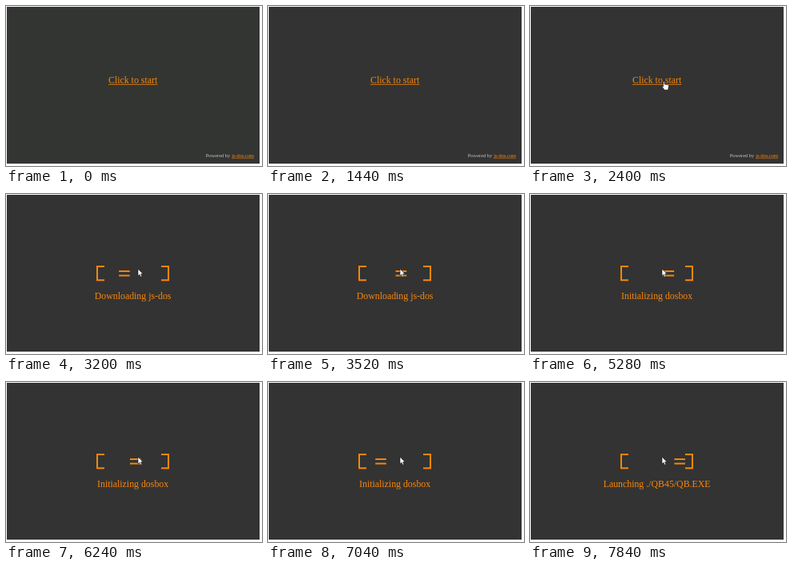
Animation of 320x201 px, one loop 8000 ms. Source, as an HTML page:

```html
<!DOCTYPE html>
<html lang="en">
<head>
<meta charset="utf-8">
<title>Loader</title>
<style>
  html, body { margin: 0; width: 100%; height: 100%; overflow: hidden; background: #fff; }
  svg { display: block; width: 320px; height: 201px; }
  text { font-family: "Liberation Serif", "Times New Roman", serif; font-size: 11.85px; fill: #f8860c; }
  .mid { text-anchor: middle; }
  .small { font-size: 6.4px; }
  .gray { fill: #c4c4c4; }
  .bar { fill: none; stroke: #f8860c; stroke-width: 2; }
  .line { fill: none; stroke: #f8860c; stroke-width: .8; }
  .pointer { fill: #fff; stroke: #111; stroke-width: .6; stroke-linejoin: round; }
</style>
</head>
<body>
<svg viewBox="0 0 320 201">
  <rect id="panel" x="1" y="1" width="316" height="197" fill="#333"/>
  <g id="start">
    <text class="mid" x="158.6" y="97">Click to start</text>
    <path class="line" d="M128 98.6H189.3"/>
    <text class="small gray" x="249.8" y="190">Powered by</text>
    <text class="small" x="282.2" y="190">js-dos.com</text>
    <path class="line" style="stroke-width:.6" d="M282.2 191.1H310"/>
  </g>
  <g id="loader">
    <path class="bar" d="M123 91H114V108.2H123M194 91H203V108.2H194"/>
    <path id="equal" class="bar" d="M0 97H13.6M0 102.6H13.6"/>
    <text id="status" class="mid" x="158.6" y="132"></text>
  </g>
  <g id="cursor">
    <path id="arrow" class="pointer" d="M0 0V9L2 7.2L3.4 10.2L4.9 9.5L3.6 6.6H6.2Z"/>
    <path id="hand" class="pointer" d="M1.6 1.2Q2.4 .2 3.2 1.2V4.2L7.4 5Q8.6 5.3 8.5 6.6L7.6 11.6H3.2L.2 7.6Q-.2 6.4 1.6 7.2Z"/>
  </g>
</svg>
<script>
const $ = id => document.getElementById(id);
const LOOP = 8000, TICK = 160, PERIOD = 1160;
const ENTER = 1600, REST = 2400, CLICK = 2880;
const FROM = [97, 38], TO = [165, 94];
const STATUS = [
  [CLICK, 'Downloading js-dos'],
  [3680, 'Initializing dosbox'],
  [7200, 'Launching ./QB45/QB.EXE']
];

const show = (id, on) => $(id).setAttribute('visibility', on ? 'visible' : 'hidden');
const place = (id, x, y) => $(id).setAttribute('transform', `translate(${x} ${y})`);

// The loader stalls twice; the first stall also stops its clock.
function loaderClock(t) {
  if (t < 4480) return t;
  if (t < 5120) return 4480;
  if (t >= 5280 && t < 5600) return 4800;
  return t - 480;
}

function drawCursor(t) {
  const p = Math.min(1, Math.max(0, (t - ENTER) / (REST - ENTER)));
  const ease = 1 - (1 - p) ** 2;
  const [x, y] = FROM.map((v, i) => v + (TO[i] - v) * ease);
  const seen = t >= ENTER;
  const onLink = t < CLICK && x > 128 && y > 87;
  place('cursor', x, y);
  show('arrow', seen && !onLink);
  show('hand', seen && onLink);
}

function draw(time) {
  const t = Math.floor((time % LOOP) / TICK + 1e-6) * TICK;
  const loading = t >= CLICK;
  $('panel').setAttribute('fill', t < 640 ? '#333533' : '#333');
  show('start', !loading);
  show('loader', loading);
  if (loading) {
    const phase = ((loaderClock(t) - 3200) / PERIOD + 1.36) % 1;
    place('equal', 117 + 67 * phase, 0);
    $('status').textContent = STATUS.filter(s => t >= s[0]).pop()[1];
  }
  drawCursor(t);
}

const begin = performance.now();
function frame() {
  draw(performance.now() - begin);
  requestAnimationFrame(frame);
}
frame();
</script>
</body>
</html>
```
